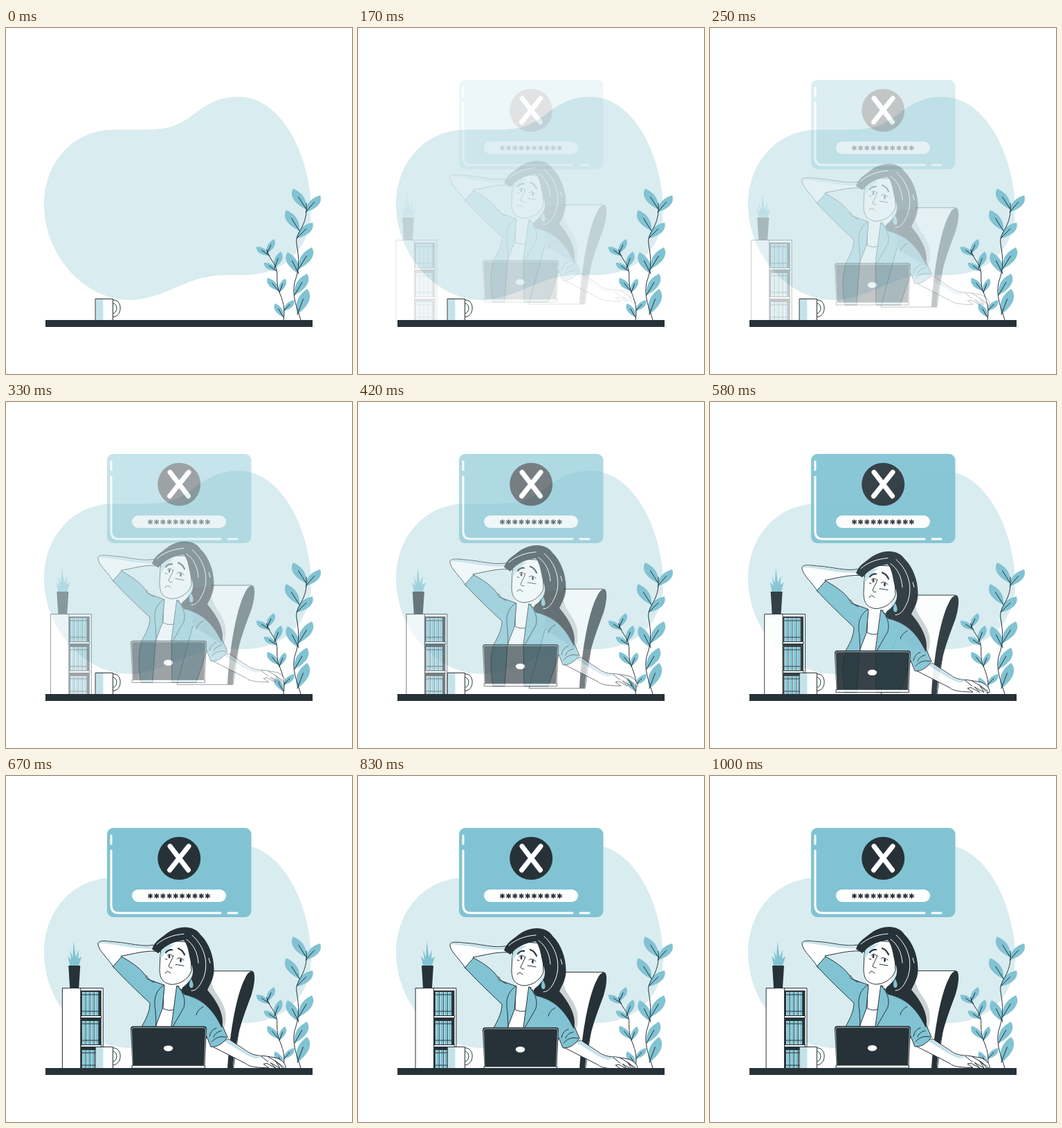
An HTML page that plays this animation: 500 px wide and 500 px high, repeating every 1.04 s.

```html
<!DOCTYPE html>
<html lang="en">
<head>
<meta charset="utf-8">
<title>Wrong password</title>
<style>
  html, body { margin: 0; width: 100%; height: 100%; overflow: hidden; background: #fff; }
  svg { display: block; width: 100vw; height: 100vh; }
  .teal { fill: #81c3d3; }
  .pale { fill: #c3e2ea; }
  .dark { fill: #263238; }
  .white { fill: #fff; }
  .ink { stroke: #263238; stroke-width: 1; stroke-linecap: round; stroke-linejoin: round; }
  .line { fill: none; }
  .chalk { fill: none; stroke: #fff; stroke-linecap: round; stroke-linejoin: round; }
  text { font: bold 13.5px "DejaVu Sans Mono", monospace; letter-spacing: 1.09px; stroke: #111; stroke-width: .5; }
</style>
</head>
<body>
<svg viewBox="0 0 500 500">
  <path fill="#d9ecf0" d="M55 255C55 195 97 147 155 147H185C205 147 225 147 241 142C273 132 287 99.500 335 99.500C400 98 441 190 441 262C441 320 400 357 345 357C320 357 305 356 284 361C250 370 215 393 180 393C110 393 55 325 55 255Z"/>

  <g id="panel">
    <rect class="teal" x="146" y="75" width="208.500" height="129" rx="9"/>
    <path class="chalk" stroke-width="3" d="M152 86V98M152 108V187Q152 198 163 198H310M321 198H334"/>
    <circle class="dark" cx="250.200" cy="119" r="31"/>
    <path class="chalk" stroke-width="7" d="M237 101.500L263.500 136M264 101.500L236.500 136"/>
    <rect class="white" x="182" y="164" width="136" height="18" rx="9"/>
    <text class="dark" x="204.400" y="179.500">**********</text>
  </g>

  <g id="plants"></g>

  <g id="shelf">
    <path class="teal" d="M92 274L89 260L94 266L92 251L96 262L97.500 239L100.500 262L105 251L104 264L109 261L105 274Z"/>
    <path class="dark" d="M90 274H107L105 306.500H92Z"/>
    <path class="white ink" d="M81.500 306.500H140V424H81.500Z"/>
    <path class="dark" d="M107.500 310H137.500V424H107.500Z"/>
    <g id="books"></g>
    <path class="white ink" d="M108 346.500H137.500V349.500H108ZM108 388.500H137.500V391.500H108Z"/>
    <path class="ink line" d="M107.500 307V424"/>
  </g>

  <g id="mug">
    <path class="white ink" fill-rule="evenodd" d="M154 393C169 391 169 418 154 417.500ZM154 398C162 397 162 413 154 412.500Z"/>
    <path class="white ink" d="M129.500 391.500H154.500V422.500H129.500Z"/>
    <path class="pale" d="M130 392H140.500V422H130Z"/>
  </g>

  <g id="chair">
    <path class="white ink" d="M298 281.500H355L346 300L328 425H247L270 340Z"/>
    <path fill="#cdd2d4" d="M300 283C291 298 303 312 310 323C319 338 320 352 314 368L270 340V285Z"/>
    <path class="dark" d="M346 291C349 284 354 281 357 282C361 286 359 302 355 315C347 338 332 370 327.500 425H320C322 385 331 318 346 291Z"/>
  </g>

  <g id="woman">
    <!-- raised arm -->
    <path class="white ink" d="M156 277C148 263 132 251 133 241C136 236 148 239 158 239.500C178 241 196 247 213 244L226 254C205 250 184 257 166 260L170 266Z"/>
    <path class="pale" d="M134 241C137 237 148 240 158 240.500C178 242 196 248 213 245L216 249C190 251 170 244 134 241Z"/>
    <!-- resting arm -->
    <path class="white ink" d="M299 391L346 415C352 420 360 421 380 421.500L372 416L377 415L390 422L382 414L396 422L389 411L400 422H404C405 416 398 409 390 407L372 404C364 404 358 403 352 400L322 380Z"/>
    <path class="pale" d="M313 382L322 381L351 401C360 405 368 404 374 405L361 408C346 404 332 392 313 382Z"/>
    <path class="ink line" d="M369 405L379 413M378 405L390 412L401 420"/>
    <!-- blouse and neck -->
    <path class="white" d="M227 298L262 290L252 345L242 422H212L218 350Z"/>
    <path class="ink line" d="M228 336Q235 340 244 337M228 302L227 336M250 303L244 337"/>
    <!-- jacket -->
    <path class="teal ink" d="M154.500 275L167 261C184 270 199 281 204 293L229 302L226 336L216 362L212 422H195C192 402 190 385 196 362C204 348 208 338 208 328C190 311 172 294 154.500 275Z"/>
    <path class="teal ink" d="M247 303C257 314 275 317 287 324C301 334 312 358 320 377C315 385 306 392 296 391L290 376L275 422H240L239 362Z"/>
    <path class="ink line" d="M228 302C216 310 213 322 216 339L217 362M203 288C207 295 211 297 214 298M248 303C256 313 260 322 257 334L241 362M275 345Q276 338 285 333M294 376Q296 366 304 364M300 377Q302 370 311 368M297 384Q305 374 318 377"/>
    <path fill="#263238" fill-opacity=".25" d="M252 308C258 317 272 320 284 328C298 338 304 350 311 362L300 320Z"/>
    <!-- head -->
    <path class="white ink" d="M229 238C222 250 223 262 222 278C222 290 225 299 239 301C252 301 264 293 268 281L266 240Z"/>
    <path class="pale" d="M229 244C224 250 223 258 223 266C228 258 232 250 244 243Z"/>
    <path class="ink line" d="M242 259C240 266 236 270 235 275Q237 278 240 277M230 285Q233 279 238 285M245 272L257 274M230 264L233 265"/>
    <path class="ink line" style="stroke-width:2.200" d="M231 255Q235 250 240 251M249 249Q255 251 258 258"/>
    <path class="ink line" d="M233 259Q237 255 241 260M247 264Q251 260 257 266"/>
    <ellipse class="dark" cx="236" cy="260.500" rx="1.400" ry="2.800"/>
    <ellipse class="dark" cx="252.500" cy="266" rx="1.400" ry="3"/>
    <!-- hair -->
    <path class="dark" d="M211 250C215 238 224 234 234 226C250 215 272 215 281 229C294 242 300 260 300.500 278C301 292 295 300 291 309C303 323 317 344 312 364C302 343 288 322 258 316C252 311 253 306 258 303C269 294 273 284 268 272C264 259 264 246 257 237C240 239 229 246 220 256Z"/>
    <path class="chalk" stroke-width="1" d="M218 243C228 234 242 229 257 228M261 236C271 243 277 255 278 270M269 230C284 243 294 266 286 290C281 302 276 310 268 310M293 263L295 270"/>
    <path class="teal" d="M267.500 293C271 299 272 305 268 306C264 306 264 299 267.500 293Z"/>
  </g>

  <g id="laptop">
    <path class="dark" d="M184 361.300H286Q290 361.300 290 365.300L287.500 418.500H182.500L180 365.300Q180 361.300 184 361.300Z"/>
    <path class="chalk" stroke-width=".6" d="M183 418L181.500 366.300Q181.500 363.300 185 363.300H285Q288.500 363.300 288.500 366.300L286.500 418"/>
    <ellipse class="white" cx="234.500" cy="393.300" rx="6.700" ry="4.200"/>
    <path class="white ink" d="M182.500 418H287.500V422H182.500Z"/>
  </g>

  <path class="dark" d="M57 422H443V432H57Z"/>
</svg>
<script>
const $ = id => document.getElementById(id);

// Leaf from base to tip: a unit shape turned and scaled into place, fuller on its outer side.
function leaf(bx, by, tx, ty) {
  const dx = tx - bx, dy = ty - by, side = Math.sign(dx);
  const at = (u, v) => {
    const w = v * side;
    return `${(bx + dx * u - dy * w).toFixed(1)} ${(by + dy * u + dx * w).toFixed(1)}`;
  };
  return `<path class="teal" d="M${at(0, 0)}C${at(.3, .2)} ${at(.8, .38)} ${at(1, 0)}C${at(.75, -.16)} ${at(.4, -.3)} ${at(0, 0)}Z"/>
    <path class="ink line" d="M${at(0, 0)}L${at(.6, 0)}"/>`;
}
const leaves = [
  [434, 262, 415, 232], [433, 266, 454, 242], [424, 293, 405, 263], [420, 304, 443, 281],
  [423, 355, 407, 324], [423, 348, 442, 317], [417, 386, 435, 355], [421, 414, 435, 377],
  [381, 329, 362, 316], [377, 326, 387, 305], [391, 351, 373, 339], [388, 347, 397, 323],
  [394, 380, 378, 361], [395, 382, 403, 362], [401, 418, 389, 398], [401, 409, 416, 393]
];
$('plants').innerHTML = leaves.map(l => leaf(...l)).join('') +
  `<path class="ink line" d="M426 422C420 402 413 388 417 368C424 348 424 335 420 312C417 294 437 288 434 253"/>
   <path class="ink line" d="M401 422C404 404 400 394 394 379C389 362 395 354 388 342C384 334 378 329 377 320"/>`;

$('books').innerHTML = [[312, 34], [354, 34], [396, 28]].map(([y, h]) =>
  [0, 1, 2, 3].map(i => {
    const x = 110 + i * 6;
    return `<rect class="teal" x="${x}" y="${y}" width="5.2" height="${h}"/>
      <rect class="pale" x="${x}" y="${y}" width="1.2" height="${h}"/>`;
  }).join('') +
  `<path class="ink line" d="M110 ${y + 4}H134M110 ${y + h - 6}H134"/>`).join('');

// cubic-bezier(.36, -.01, .5, 1.38)
function ease(x) {
  if (x <= 0 || x >= 1) return x <= 0 ? 0 : 1;
  const curve = (a, b, s) => 3 * (1 - s) * (1 - s) * s * a + 3 * (1 - s) * s * s * b + s ** 3;
  let lo = 0, hi = 1;
  for (let i = 0; i < 30; i++) {
    const mid = (lo + hi) / 2;
    if (curve(.36, .5, mid) < x) lo = mid; else hi = mid;
  }
  return curve(-.01, 1.38, lo);
}

const LOOP = 1040, FPS = 24, SLIDE = 30;

function draw(now) {
  const step = Math.floor((now % LOOP + 4) * FPS / 1000);
  const p = step < 2 ? 0 : ease((step + .6) / FPS);
  const shift = (SLIDE * (p - 1)).toFixed(2);
  for (const id of ['panel', 'shelf', 'chair', 'woman', 'laptop'])
    $(id).setAttribute('opacity', Math.max(0, Math.min(1, p)));
  $('shelf').setAttribute('transform', `translate(${shift} 0)`);
  for (const id of ['chair', 'woman', 'laptop'])
    $(id).setAttribute('transform', `translate(0 ${shift})`);
}

const start = performance.now();
function tick() {
  draw(performance.now() - start);
  requestAnimationFrame(tick);
}
tick();
</script>
</body>
</html>
```
